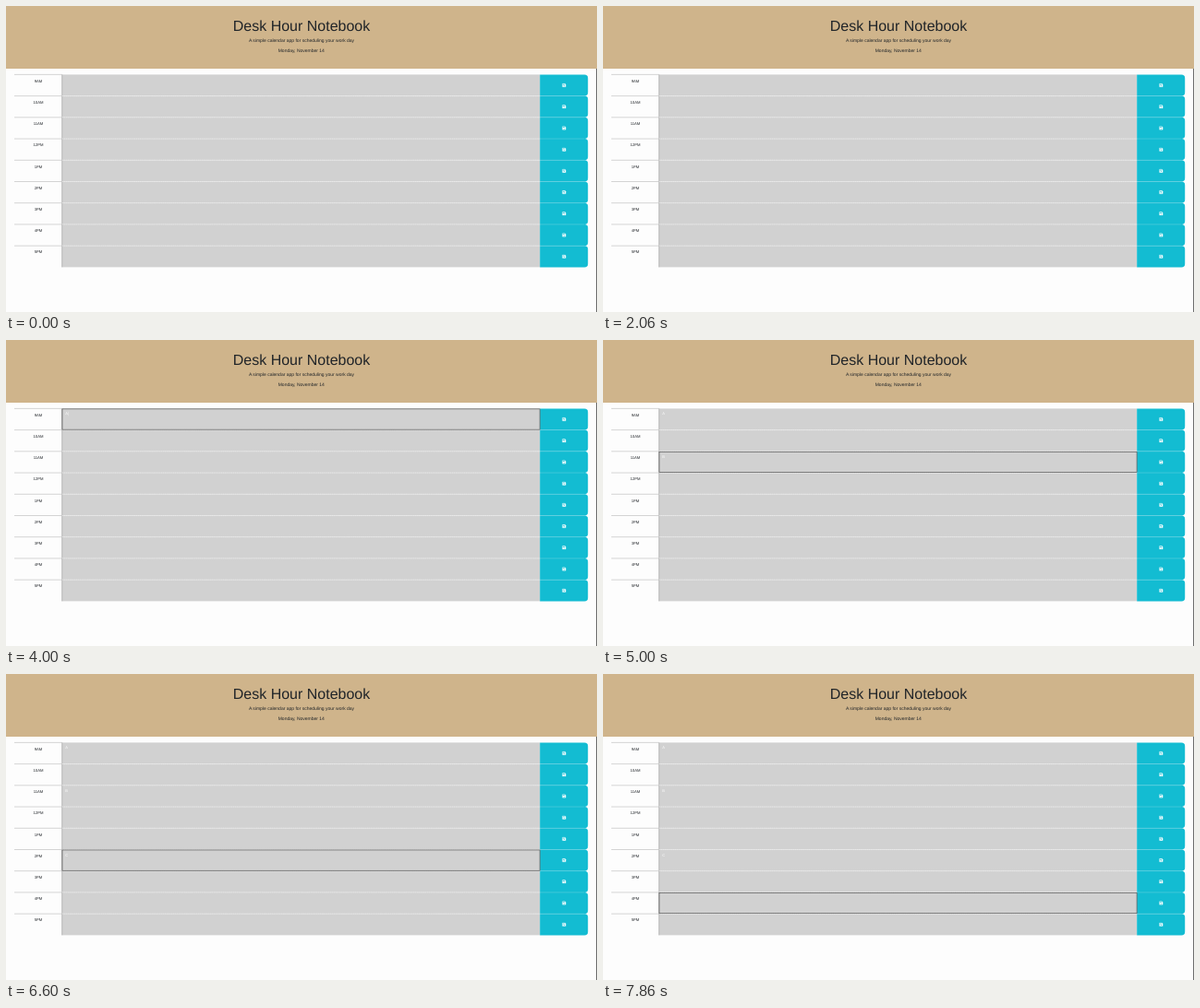
An HTML page for the animation above (8 s loop, 640 by 332 pixels).

```html
<!DOCTYPE html>
<html lang="en">
<head>
<meta charset="utf-8">
<title>Day planner</title>
<style>
  html, body { margin: 0; width: 100%; height: 100%; overflow: hidden; background: #fdfdfd; }
  svg { display: block; width: 100%; height: 100%; }
  text { font-family: "Liberation Sans", Arial, sans-serif; fill: #212529; text-rendering: geometricPrecision; }
  .mid { text-anchor: middle; }
</style>
</head>
<body>
<svg id="stage" viewBox="0 0 640 332"></svg>
<script>
const LOOP = 8000;
const TOP = 74.4, PITCH = 23.22;
const LEFT = 9, FIELD = 60.7, SAVE = 578.2, RIGHT = 630.2;
const TEAL = "#13bcd2", TAN = "#cfb48b";
const HOURS = ["9AM", "10AM", "11AM", "12PM", "1PM", "2PM", "3PM", "4PM", "5PM"];

// Each step focuses a row; a letter is typed into it later.
const STEPS = [
  { row: 0, focus: 3800, typed: 4000, text: "A" },
  { row: 2, focus: 4130, typed: 4460, text: "B" },
  { row: 5, focus: 5600, typed: 5860, text: "C" },
  { row: 7, focus: 7330, typed: Infinity, text: "" }
];

const stage = document.getElementById("stage");
const rowY = i => TOP + i * PITCH;

function add(tag, attrs, text) {
  const el = document.createElementNS(stage.namespaceURI, tag);
  for (const key in attrs) el.setAttribute(key, attrs[key]);
  if (text) el.textContent = text;
  stage.appendChild(el);
  return el;
}

const rect = (x, y, width, height, fill) => add("rect", { x, y, width, height, fill });
const label = (x, y, size, text) => add("text", { x, y, "font-size": size, class: "mid" }, text);

function line(x1, y1, x2, y2, stroke, width, dash = "none") {
  return add("line", { x1, y1, x2, y2, stroke, "stroke-width": width, "stroke-dasharray": dash });
}

function saveIcon(cx, cy) {
  add("path", {
    d: `M${cx - 1.75} ${cy - 1.75}h2.7l.8 .8v2.7h-3.5z`,
    fill: "#fff", stroke: "#fff", "stroke-width": .25, "stroke-linejoin": "round"
  });
  rect(cx - 1.2, cy - 1.2, 1.9, .8, TEAL);
  add("circle", { cx, cy: cy + .7, r: .5, fill: TEAL });
}

function drawRow(hour, i) {
  const y = rowY(i), h = PITCH, r = 3.75;
  rect(FIELD, y, SAVE - FIELD, h, "#d1d1d1");
  add("path", {
    d: `M${SAVE} ${y}H${RIGHT - r}a${r} ${r} 0 0 1 ${r} ${r}v${h - 2 * r}` +
       `a${r} ${r} 0 0 1 ${-r} ${r}H${SAVE}z`,
    fill: TEAL
  });
  line(LEFT, y, FIELD, y, "#cbcbcb", .8);
  if (i) {
    line(FIELD, y, SAVE, y, "#ececec", .8, "1.6 .5");
    line(SAVE, y, RIGHT - r, y, "#7fd6e2", .4);
  }
  line(FIELD, y, FIELD, y + h, "#999", .6);
  label(35, y + 8.3, 4.2, hour);
  saveIcon(604.4, y + 11.6);
}

rect(0, 0, 640, 332, "#fdfdfd");
rect(639.2, 68, .8, 264, "#4a4a4a");
rect(0, 0, 640, 68, TAN);
label(320, 27.3, 16, "Desk Hour Notebook");
label(320, 38.6, 5, "A simple calendar app for scheduling your work day");
label(319.8, 50, 5, "Monday, November 14");
HOURS.forEach(drawRow);

for (const s of STEPS) {
  s.letter = add("text", { x: 64.2, y: rowY(s.row) + 7, "font-size": 4, style: "fill:#fff" }, s.text);
}
const ring = add("rect", {
  x: FIELD + .2, width: SAVE - FIELD - .3, height: PITCH - .9,
  fill: "none", stroke: "#4a4a4a", "stroke-width": .65
});
const caret = rect(0, 0, .35, 4.4, "#f4f4f4");

const show = (el, on) => el.setAttribute("visibility", on ? "visible" : "hidden");

function render(t) {
  let active = null;
  for (const s of STEPS) {
    show(s.letter, t >= s.typed);
    if (t >= s.focus) active = s;
  }
  show(ring, active);
  show(caret, false);
  if (!active) return;

  const y = rowY(active.row), typed = t >= active.typed;
  const since = t - (typed ? active.typed : active.focus);
  ring.setAttribute("y", y + .45);
  caret.setAttribute("x", typed ? 67.1 : 64.1);
  caret.setAttribute("y", y + 3.4);
  show(caret, since % 1000 < 500);
}

const start = performance.now();
function tick() {
  render((performance.now() - start) % LOOP);
  requestAnimationFrame(tick);
}
tick();
</script>
</body>
</html>
```
